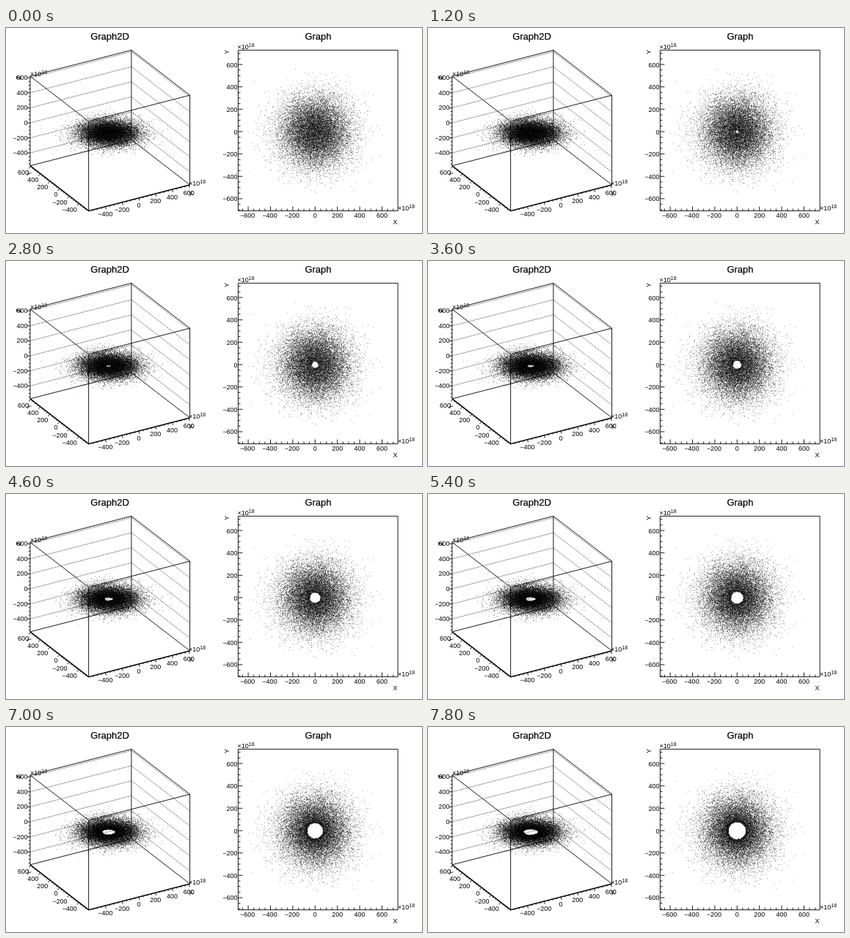
An HTML page with a canvas that plays this animation: 567x281 px, repeating every 8 s.

```html
<!DOCTYPE html>
<html lang="en">
<head>
<meta charset="utf-8">
<title>Graph2D</title>
<style>
html, body { margin: 0; width: 100%; height: 100%; overflow: hidden; background: #fff; }
canvas, svg { position: absolute; left: 0; top: 0; width: 567px; height: 281px; }
svg { font: 9px "Liberation Sans", Arial, sans-serif; }
path { fill: none; stroke: #000; stroke-width: 0.9; }
.axis { stroke-width: 1.5; }
.dotted { stroke-dasharray: 1 1.5; }
.title { font-size: 13px; stroke: #000; stroke-width: 0.2; }
</style>
</head>
<body>
<canvas id="stars" width="567" height="281"></canvas>
<svg id="axes" viewBox="0 0 567 281"></svg>
<script>
const STEP = 200, LOOP = 8000;
const parts = [];

const line = (points, cls = '') =>
  parts.push(`<path class="${cls}" d="M${points.map(p => p.join()).join('L')}"/>`);
const text = (x, y, s, anchor = 'middle', extra = '') =>
  parts.push(`<text x="${x}" y="${y}" text-anchor="${anchor}" ${extra}>${s}</text>`);
const label = v => v < 0 ? '\u2212' + -v : String(v);
const turned = (x, y, s, angle) =>
  text(x, y, s, 'middle', `transform="rotate(${angle} ${x} ${y})"`);
const power = (x, y) =>
  text(x, y, '×10<tspan dy="-3" font-size="7">18</tspan>', 'start');

function ticks(from, to, place, dir, minor, major) {
  for (let v = from; v <= to; v += 50) {
    const [x, y] = place(v), n = v % 200 ? minor : major;
    line([[x, y], [x + dir[0] * n, y + dir[1] * n]]);
  }
}

// Both pads share the same top and bottom
const TOP = 30.35, BOTTOM = 250.65;

// Flat graph
const flatX = v => 421.3 + v * 0.152;
const flatY = v => 142 - v * 0.1533;
line([[316.4, TOP], [534.1, TOP], [534.1, BOTTOM], [316.4, BOTTOM], [316.4, TOP]]);
ticks(-650, 700, v => [flatX(v), BOTTOM], [0, -1], 3, 6);
ticks(-700, 700, v => [316.4, flatY(v)], [1, 0], 3, 6);
for (let v = -600; v <= 600; v += 200) {
  text(flatX(v) - (v < 0 ? 1 : 0), 260, label(v));
  text(315.5, flatY(v) + 3.5, label(v), 'end');
}
text(425.5, 16, 'Graph', 'middle', 'class="title"');
power(315.5, 29);
power(534, 250);
text(530.5, 269, 'X');
turned(304, 33, 'Y', -90);

// Box
const HEIGHT = 122.8;
const left = [32.9, 66.05], back = [170.9, TOP], right = [250.6, 92.15];
const front = [112.6, BOTTOM - HEIGHT];
const drop = ([x, y], d = HEIGHT) => [x, y + d];
line([left, back, right, front, left]);
line([drop(left), drop(back), drop(right)]);
line([drop(left), drop(front), drop(right)], 'axis');
for (const corner of [left, back, right, front]) line([corner, drop(corner)]);

const boxX = v => [181 + v * 0.1138, 232.8 - v * 0.0294];
const boxY = v => [73 - v * 0.0657, 219.9 - v * 0.0509];
const boxZ = v => [left[0], 130 - v * 0.103];
ticks(-550, 600, boxX, [0.25, 0.97], 2, 4);
ticks(-550, 600, boxY, [-0.61, 0.79], 2, 4);
ticks(-550, 600, boxZ, [-1, 0], 2, 4);
for (let v = -400; v <= 600; v += 200) {
  const [xx, xy] = boxX(v), [yx, yy] = boxY(v), z = boxZ(v)[1];
  text(xx, xy + 13.5, label(v));
  text(yx - 2.5, yy + 11.5, label(v), 'end');
  text(29.5, z + 3, label(v), 'end');
  const d = z - left[1];
  line([drop(left, d), drop(back, d), drop(right, d)], 'dotted');
}
text(141.5, 16, 'Graph2D', 'middle', 'class="title"');
power(33, 66);
power(249, 216);
turned(253, 230, 'X', -15);
turned(29, 202, 'Y', 38);
turned(20, 68, 'Z', -90);
document.getElementById('axes').innerHTML = parts.join('');

// Star disc: a Gaussian cloud whose stars drift along their tangents,
// slower further out, so the opening centre gathers a dense rim
let seed = 20177;
function random() {
  seed = seed + 0x6D2B79F5 | 0;
  let t = Math.imul(seed ^ seed >>> 15, 1 | seed);
  t = t + Math.imul(t ^ t >>> 7, 61 | t) ^ t;
  return ((t ^ t >>> 14) >>> 0) / 4294967296;
}
const stars = Array.from({ length: 16000 }, () => {
  const r = 24 * Math.sqrt(-2 * Math.log(1 - random()));
  const a = random() * 2 * Math.PI;
  const speed = (1.45 + 0.2 * random()) / Math.sqrt(1 + r * r / 260);
  return {
    x: r * Math.cos(a), y: r * Math.sin(a),
    vx: -speed * Math.sin(a), vy: speed * Math.cos(a),
    z: (random() + random() - 1) * 1.5
  };
});

// Dots smaller than a pixel blend into soft greys
const DOT = 0.6;
const ctx = document.getElementById('stars').getContext('2d');
const dot = (x, y) => ctx.fillRect(x - DOT / 2, y - DOT / 2, DOT, DOT);

function draw(now) {
  const t = Math.floor(now % LOOP / STEP) * STEP / 1000;
  ctx.clearRect(0, 0, 567, 281);
  for (const s of stars) {
    const x = s.x + s.vx * t, y = s.y + s.vy * t;
    dot(421.3 + x, 142.2 - y);
    dot(140 + 0.748 * x - 0.428 * y, 144 - 0.195 * x - 0.333 * y + s.z);
  }
}

const start = performance.now();
function frame() {
  draw(performance.now() - start);
  requestAnimationFrame(frame);
}
frame();
</script>
</body>
</html>
```
